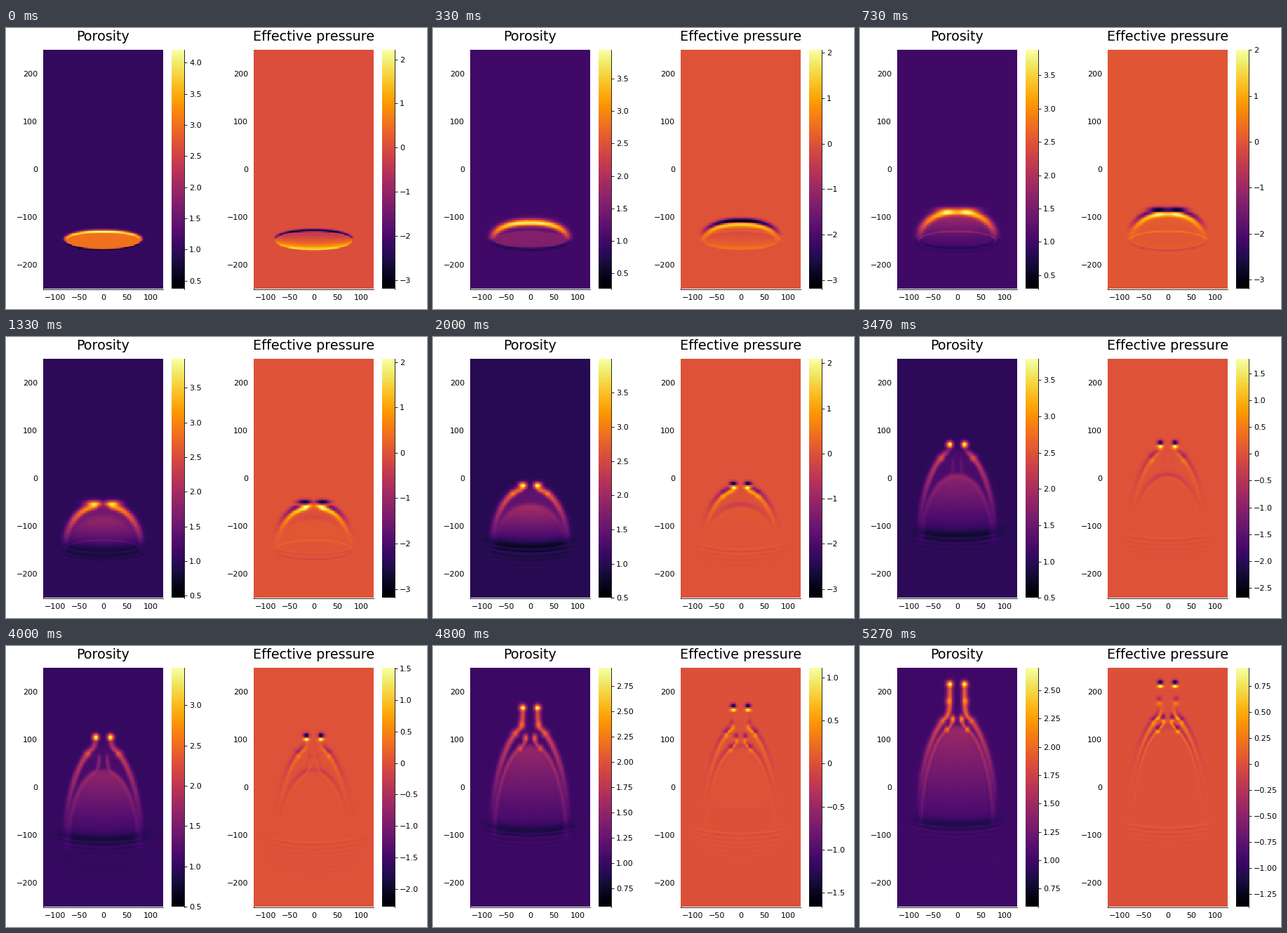
A matplotlib script for the animation above (5.34 s loop, 600 by 400 pixels).

```python
import numpy as np
import matplotlib.pyplot as plt
from matplotlib.animation import FuncAnimation

plt.rcParams["font.family"] = "DejaVu Sans"
W, H = 600, 400
STEPS = 80
HOLD = 1  # the last pose rests for one more tick
LOOP_MS = 5340
CELL = 2.0

X, Y = np.meshgrid(np.arange(-124, 125, CELL), np.arange(-249, 250, CELL))
AX = np.abs(X)
t = np.linspace(0, 1, STEPS)


def ease(a, b):
    """Smooth step over the run, from 0 at time a to 1 at time b."""
    u = np.clip((t - a) / (b - a), 0, 1)
    return u * u * (3 - 2 * u)


def sig(z):
    return 0.5 * (1 + np.tanh(z / 2))


def bell(z, s):
    return np.exp(-0.5 * (z / s) ** 2)


def blob(x, y, sx, sy):
    return bell(AX - x, sx) * bell(Y - y, sy)


def shell(a, base, height, p=2.0):
    """Approximate signed distance to a dome outline, negative inside."""
    u, v = AX / a, (Y - base) / height
    r = np.sqrt(u**p + v**2) + 1e-6
    slope = np.hypot(p * u ** (p - 1) / a, 2 * v / height) / (2 * r) + 1e-6
    return np.clip((r - 1) / slope, -120, 120)


def stem(x0, x1, y0, y1, width):
    """Vertical ridge that bends from x1 at its foot to x0 higher up."""
    x = x0 + (x1 - x0) * np.exp(-np.clip(Y - y0, 0, None) / 10)
    return bell(AX - x, width) * sig((Y - y0) / 3) * sig((y1 - Y) / 3)


# outer and inner wave fronts
out_top = -131 + 290 * t
out_base = -150 + 95 * t**4
out_amp = 3 * np.exp(-1.2 * t)
out_width = 4.6 - 1.8 * np.exp(-25 * t) + 30 * t * np.exp(-7 * t)
out_fall = 1.1 - 0.85 * np.exp(-9 * t)
out_cut = 0.95 * ease(0.1, 0.33)
cut_width = 13 + 10 * ease(0.33, 0.56)
dome_power = 2.4 - 0.7 * t
in_top = -130 + 180 * t + 78 * t**4
in_base = -145 + 57 * t**6
in_amp = 0.95 * ease(0.12, 0.38) * (1 - 0.3 * t)
in_width = 9 - 5 * t
in_cut = 0.9 * ease(0.65, 0.9)

# material left behind the fronts
in_fill = 0.65 * ease(0.1, 0.38) * (1 - 0.25 * t)
out_fill = 0.8 * ease(0, 0.14) * (1 - t) ** 1.2
trail = 0.6 * (ease(0, 0.14) - ease(0.14, 0.33))

# leading pulses and their followers
lead_y = -131 + 302 * t + 43 * t**8
lead_x = 22 - 6.5 * ease(0.14, 0.38)
lead_sx = 16 - 11 * ease(0.14, 0.45)
lead_w = 0.75 * ease(0, 0.14) + 0.25 * ease(0.14, 0.38)
side_x = 40 - 10 * t
side_amp = 1.9 * ease(0.2, 0.38) * (1 - 0.6 * t)
next_amp = 1.05 * ease(0.7, 0.95)
knot_amp = 1.1 * ease(0.74, 0.95)
stem_amp = 0.95 * ease(0.4, 0.85)
core_amp = 0.8 * ease(0.38, 0.95)
core_len = 45 - 18 * ease(0.7, 0.9)

# compacted floor and ripples below it
floor_y = -150 + 75 * t**1.9
floor_bow = 8 + 12 * np.exp(-8 * t)
floor_dark = 0.4 * ease(0.1, 0.38) * (1 - 0.6 * t)
ripple_amp = 0.24 * ease(0.1, 0.38) * (1 - 0.55 * t)
outline = 0.35 * (ease(0, 0.14) - ease(0.14, 0.36))
speckle = 0.15 * ease(0.5, 0.76)

# colour ranges
calm = ease(0.42, 1.15)
phi_lo = 0.498 + 0.09 * ease(0.74, 1) - 0.25 * bell(t - 0.09, 0.08)
phi_hi = (4.041 + 0.27 * np.exp(-30 * t) - 0.16 * bell(t - 0.14, 0.15)
          - 1.45 * ease(0.5, 1.1))
pe_lo = -3.2 + 2.05 * calm
pe_hi = 2.1 + 0.13 * np.exp(-30 * t) - 0.1 * bell(t - 0.14, 0.07) - 1.32 * calm
pe_gain = 0.1 + 0.9 * ease(0, 0.1)

# lens that everything starts from
LENS = shell(80, -150, 20)
LENS_IN = sig(-LENS / 0.6)
LENS_U = np.sqrt(np.clip(1 - (X / 80) ** 2, 0, 1))
LENS_LOW = sig(-(Y + 152) / 2)
BOWL = np.clip(1 - (X / 80) ** 2, -0.5, 1)


def fields(i):
    p = dome_power[i]
    h_out = out_top[i] - out_base[i]
    h_in = in_top[i] - in_base[i]
    d_out = shell(79, out_base[i], h_out, p)
    d_in = shell(75, in_base[i], h_in)
    u_out = np.clip((Y - out_base[i]) / h_out, 0, 1) ** out_fall[i]
    u_in = np.clip((Y - in_base[i]) / h_in, 0, 1) ** 0.8
    gate_out = 1 - out_cut[i] * np.exp(-(X / cut_width[i]) ** 4)
    gate_in = 1 - in_cut[i] * np.exp(-(X / 15) ** 4)
    floor = floor_y[i] - floor_bow[i] * BOWL
    rise = np.clip((Y - floor) / np.maximum(in_top[i] - floor, 10), 0, 1)
    side_y = out_base[i] + h_out * np.sqrt(1 - (side_x[i] / 79) ** p)
    knot_y = in_base[i] + h_in * 0.96

    parts = [
        out_amp[i] * u_out * gate_out * bell(d_out, out_width[i]),
        out_amp[i] * trail[i] * u_out * np.exp(np.minimum(d_out, 0) / 14) * sig(-d_out / 2),
        in_amp[i] * u_in * gate_in * bell(d_in, in_width[i]),
        rise * (in_fill[i] * sig(-d_in / 3) + out_fill[i] * sig(-d_out / 3)),
        lead_w[i] * (phi_hi[i] - 1) * blob(lead_x[i], lead_y[i], lead_sx[i], 5.3),
        side_amp[i] * blob(side_x[i], side_y, 6, 6),
        next_amp[i] * blob(17, lead_y[i] - 35, 5, 7.5),
        knot_amp[i] * blob(9.5, knot_y + 22, 4.5, 6.5),
        0.85 * knot_amp[i] * blob(21, knot_y, 5, 6),
        stem_amp[i] * stem(15.5, side_x[i], side_y, lead_y[i], 4.5),
        core_amp[i] * stem(8, 21, knot_y, knot_y + core_len[i], 3.8),
    ]
    cubes = sum(part**3 for part in parts)
    wave = np.cbrt(cubes)
    fade = np.exp(-i / 4)
    phi = 1 + np.cbrt(cubes + (2 * fade * LENS_IN) ** 3)

    # floor, ripples and fine texture
    window = 1 / (1 + (X / 86) ** 12)
    depth = np.clip(floor - Y, 0, None)
    ripple = ripple_amp[i] * window * np.sin(2 * np.pi * depth / 9.5) * np.exp(-depth / 18)
    stripes = 0.012 * np.cos(2 * np.pi * X / 6.5) * sig(-d_out / 3) * sig((Y - floor) / 4)
    line = outline[i] * bell(LENS, 1.3)
    phi += ripple + line + stripes
    phi -= floor_dark[i] * window * bell(Y - floor - 4, 7.5)
    phi += speckle[i] * np.cos(np.pi * X / 2) * np.cos(np.pi * (Y + 1) / 2) * blob(77, -158, 4, 9)
    thick = min(1.3 + 0.3 * i, 5)
    dent = np.exp(-i / 15) * LENS_LOW * bell(LENS + 0.6 * thick, thick)
    phi += (0.4 - phi) * dent

    # pressure follows the vertical gradient; strong waves move fastest
    grad = np.gradient(wave, CELL, axis=0) * wave**0.6
    pe = np.where(grad < 0, grad / grad.min() * pe_lo[i],
                  grad / grad.max() * pe_hi[i] * pe_gain[i])
    above = np.clip(Y + 150 + 20 * LENS_U, 0, None)
    below = np.clip(-150 + 20 * LENS_U - Y, 0, None)
    start = 2.3 * np.exp(-above / 9) - 0.9 * np.exp(-below / 9)
    pe += fade * LENS_IN * np.sqrt(LENS_U) * start
    pe += 0.8 * ripple + 1.2 * line * np.tanh((Y + 150) / 8)
    return phi, pe


def axes_px(fig, x, y, w, h):
    ax = fig.add_axes([x / W, 1 - (y + h) / H, w / W, h / H])
    ax.patch.set_visible(False)
    for spine in ax.spines.values():
        spine.set_linewidth(0.6)
    return ax


def label(v, digits=0):
    text = f"{abs(v):.{digits}f}" if abs(v) > 1e-9 else "0"
    return "\u2212" + text if v < -1e-9 else text


def bar_ticks(lo, hi):
    """Finest step that keeps at most ten ticks."""
    for step, digits in ((0.25, 2), (0.5, 1), (1, 0)):
        ticks = np.arange(np.ceil(lo / step), np.floor(hi / step) + 1) * step
        if len(ticks) <= 10:
            break
    return ticks, [label(v, digits) for v in ticks]


class Panel:
    def __init__(self, fig, left, title):
        ax = axes_px(fig, left, 31, 170.5, 340.5)
        self.image = ax.imshow(np.zeros(X.shape), cmap="inferno", origin="lower",
                               extent=(-125, 125, -250, 250), aspect="auto",
                               interpolation="nearest", zorder=1)
        for name, spine in ax.spines.items():
            spine.set_zorder(0)
            spine.set_visible(name in ("left", "bottom"))
        xs, ys = range(-100, 101, 50), range(-200, 201, 100)
        ax.set_xticks(xs, [label(v) for v in xs])
        ax.set_yticks(ys, [label(v) for v in ys])
        ax.tick_params(length=0, labelsize=8)
        ax.tick_params(axis="x", pad=5.1)
        ax.tick_params(axis="y", pad=5.6)
        fig.text((left + 85.3) / W, 1 - 17.8 / H, title, size=13.75,
                 ha="center", va="baseline")

        self.bar = axes_px(fig, left + 183, 31, 17.5, 340.5)
        self.scale = self.bar.imshow(np.linspace(0, 1, 256)[:, None], cmap="inferno",
                                     origin="lower", aspect="auto")
        for name in ("left", "top", "bottom"):
            self.bar.spines[name].set_visible(False)
        self.bar.set_xticks([])
        self.bar.yaxis.tick_right()
        self.bar.tick_params(axis="y", length=3, width=0.6, pad=2.6, labelsize=8)

    def show(self, data, lo, hi):
        self.image.set_data(data)
        self.image.set_clim(lo, hi)
        self.scale.set_extent((0, 1, lo, hi))
        self.bar.set_yticks(*bar_ticks(lo, hi))
        self.bar.set_ylim(lo, hi)


fig = plt.figure(figsize=(W / 100, H / 100), dpi=100, facecolor="white")
porosity = Panel(fig, 53, "Porosity")
pressure = Panel(fig, 353, "Effective pressure")


def draw(tick):
    i = min(tick, STEPS - 1)
    phi, pe = fields(i)
    porosity.show(phi, phi_lo[i], phi_hi[i])
    pressure.show(pe, pe_lo[i], pe_hi[i])
    return []


anim = FuncAnimation(fig, draw, frames=STEPS + HOLD,
                     interval=LOOP_MS / (STEPS + HOLD), repeat=True)
plt.show()
```
